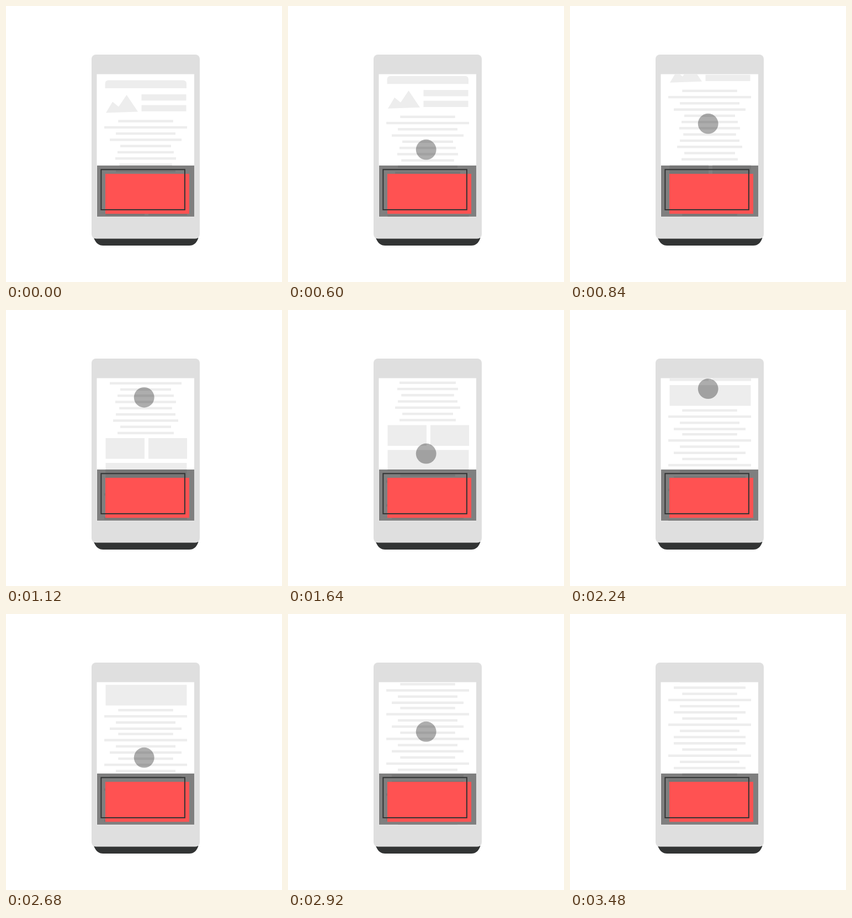
These frames come from a looping animation (500 px wide and 500 px high, 5.8 s). An HTML page:

```html
<!DOCTYPE html>
<html lang="en">
<head>
<meta charset="utf-8">
<title>Scrolling page with sticky ad</title>
<style>
  html, body { margin: 0; height: 100%; overflow: hidden; background: #fff; }
  svg { display: block; width: 100%; height: 100%; }
</style>
</head>
<body>
<svg viewBox="0 0 500 500">
  <clipPath id="screen"><rect x="164.5" y="123.5" width="176.5" height="259"/></clipPath>
  <path fill="#323434" d="M159 420H348.5Q344 434 332 434H176Q164 434 159 420Z"/>
  <rect x="155" y="88" width="196" height="333.5" rx="8" fill="#dfdfdf"/>
  <rect x="164.5" y="123.5" width="176.5" height="259" fill="#fff"/>
  <g clip-path="url(#screen)">
    <g id="page" fill="#ededed">
      <path d="M179.5 149V141Q179.5 134.5 186 134.5H320.5Q327 134.5 327 141V149Z"/>
      <path d="M181 193.5L193 173.5L204 182.5L218.5 161L239 191.5Z"/>
      <rect x="245.5" y="160" width="81" height="11.3"/>
      <rect x="245.5" y="179.5" width="81" height="11.3"/>
      <rect x="180.5" y="341.7" width="70.5" height="37.5"/>
      <rect x="258" y="341.7" width="70" height="37.5"/>
      <rect x="180.5" y="386.7" width="147" height="37.5"/>
    </g>
  </g>
  <rect x="165" y="289" width="176" height="92.7" fill="#000" fill-opacity=".5"/>
  <rect x="180" y="304" width="152" height="72.5" fill="#ff5252"/>
  <rect x="172.3" y="296.3" width="151.6" height="72.8" fill="none" stroke="#323434" stroke-width="2"/>
  <circle id="finger" cx="250.2" fill="#000" fill-opacity=".32"/>
</svg>
<script>
const page = document.getElementById('page');
const finger = document.getElementById('finger');

// Centred text lines, given by their widths
function addLines(top, gap, widths) {
  widths.forEach((w, i) => {
    const line = document.createElementNS(page.namespaceURI, 'rect');
    const box = { x: 253 - w / 2, y: top + i * gap - 2.2, width: w, height: 4.4 };
    for (const key in box) line.setAttribute(key, box[key]);
    page.append(line);
  });
}
const verse = [99.5, 150, 108, 130];
addLines(208.6, 11.27, [...verse, 92, 102, 110, 95.5, 108, 118, 92, 102]);
[432.6, 475.8, 520.5, 565.3, 621.4, 666.4].forEach(y => addLines(y, 11.2, verse));
addLines(610.2, 0, [130]);

const LOOP = 5800, STEP = 40, START = 11, SWIPE = 26, SWIPES = 3;
const DRAG = 125.3, RADIUS = 18.4;
const clamp = (v, lo, hi) => Math.min(hi, Math.max(lo, v));

// Finger size over one swipe: pop in, hold, shrink away
function fingerScale(i) {
  if (i === 0) return 0.5;
  if (i < 22) return 1;
  return [0.81, 0.25][i - 22] || 0;
}

function draw(now) {
  const tick = Math.floor((now % LOOP) / STEP + 0.001) - START;
  const k = clamp(tick, -1, SWIPES * SWIPE - 1);
  const i = (k + SWIPE) % SWIPE;
  const drag = DRAG * clamp((i - 3) / 16, 0, 1);
  const scroll = DRAG * Math.floor(k / SWIPE) + drag;
  page.setAttribute('transform', `translate(0 ${-scroll})`);
  finger.setAttribute('cy', 268 - drag);
  finger.setAttribute('r', RADIUS * fingerScale(i));
  requestAnimationFrame(draw);
}
draw(0);
</script>
</body>
</html>
```
